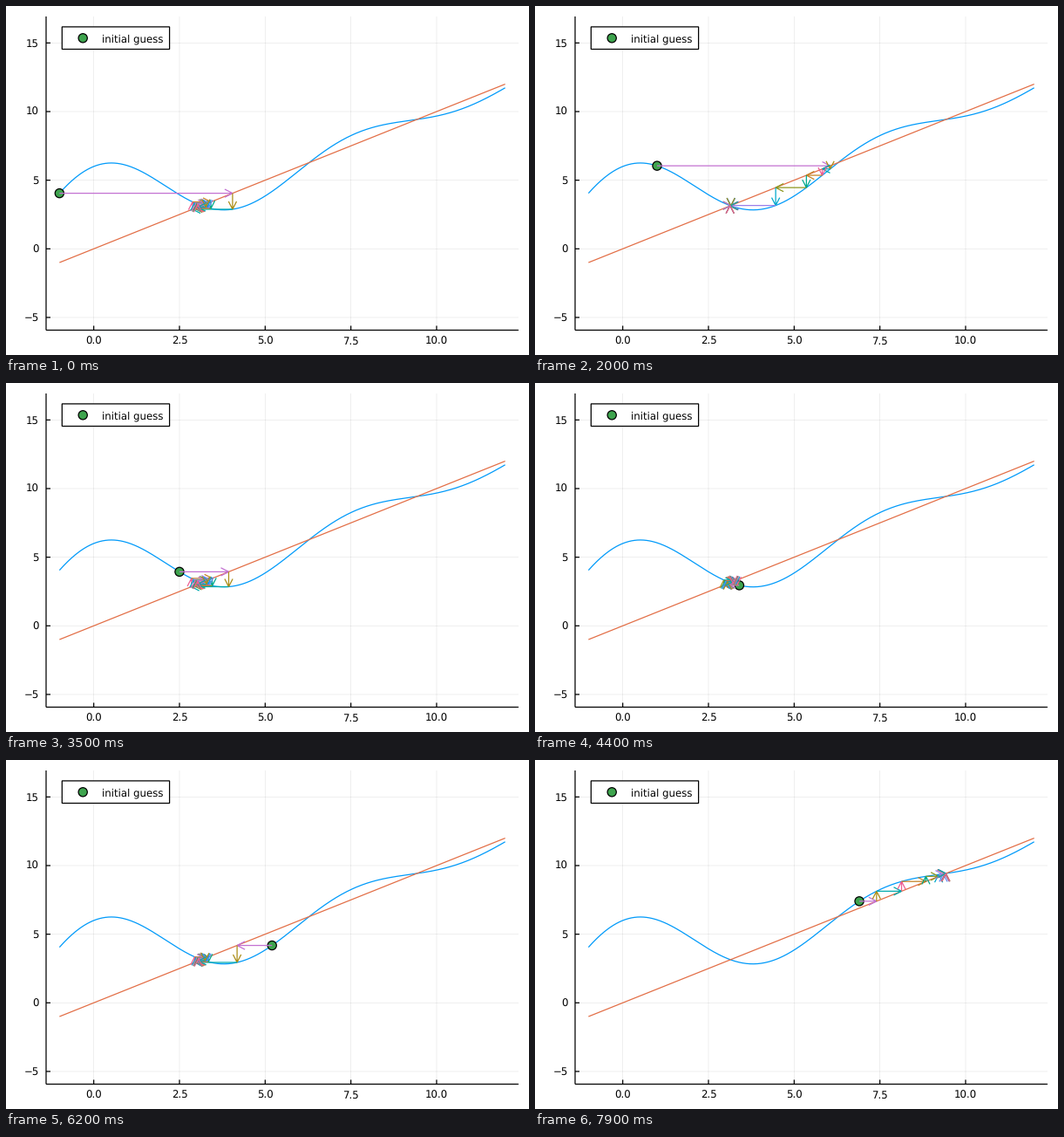
These frames come from a looping animation (600x400 px, 8000 ms). A matplotlib script:

```python
import numpy as np
import matplotlib.pyplot as plt
from matplotlib.animation import FuncAnimation
from matplotlib.patches import Circle, Rectangle

plt.rcParams.update({
    "font.family": "DejaVu Sans",
    "font.size": 8.5,
    "text.hinting": "none",
    "path.snap": False,
    "lines.solid_capstyle": "butt",
    "lines.solid_joinstyle": "miter",
})

W, H, DPI = 600, 400, 100
LW = 0.9
FRAMES, STEP_MS = 80, 100
STEPS = 10
HEAD_LEN, HEAD_HALF = 9.0, 4.6
LEFT, RIGHT, TOP, BOTTOM = 46, 588, 12, 371.5

PALETTE = [
    "#009AFA", "#E36F47", "#3EA44E", "#C371D2", "#AC8E18", "#00AAAE",
    "#ED5E93", "#C68225", "#00A98D", "#8E971E", "#00A9CC", "#9B7FE9",
    "#618DF6", "#F06073", "#DD65B6", "#6C9F33",
]


def g(x):
    """Iterated map x + 6 sin(x) / x."""
    return x + 6 * np.sinc(x / np.pi)


def px(x):
    return 100.67 + 39.332 * x


def py(y):
    return 278.3 - 15.73 * y


fig = plt.figure(figsize=(W / DPI, H / DPI), dpi=DPI, facecolor="white")
ax = fig.add_axes([0, 0, 1, 1])
ax.set_xlim(0, W)
ax.set_ylim(H, 0)
ax.axis("off")


def line(xs, ys, color="black", lw=LW, **kw):
    return ax.plot(xs, ys, color=color, lw=lw, **kw)[0]


def dot(x, y, z):
    return ax.add_patch(Circle((x, y), 5.1, fc=PALETTE[2], ec="black", lw=LW, zorder=z))


# Grid, ticks and axes
for v in (0, 2.5, 5, 7.5, 10):
    x = px(v)
    line([x, x], [TOP, BOTTOM], lw=0.45, alpha=0.1, zorder=1)
    line([x, x], [BOTTOM, BOTTOM - 5], zorder=2)
    ax.text(x, 388, f"{v:.1f}", ha="center", va="baseline")
for v in (-5, 0, 5, 10, 15):
    y = py(v)
    line([LEFT, RIGHT], [y, y], lw=0.45, alpha=0.1, zorder=1)
    line([LEFT, LEFT + 5], [y, y], zorder=2)
    ax.text(38, y + 4.3, str(v).replace("-", "\u2212"), ha="right", va="baseline")
line([LEFT, LEFT], [TOP, BOTTOM], zorder=2)
line([LEFT, RIGHT], [BOTTOM, BOTTOM], zorder=2)

# Map and diagonal
t = np.linspace(-1, 12, 600)
line(px(t), py(g(t)), PALETTE[0], zorder=3)
line(px(t[[0, -1]]), py(t[[0, -1]]), PALETTE[1], zorder=4)

guess = dot(0, 0, 5)
arrows = [line([], [], PALETTE[(3 + k) % 16], zorder=6 + k) for k in range(2 * STEPS)]

# Legend
ax.add_patch(Rectangle((64.3, 23.9), 123.3, 25.6, fc="white", ec="black", lw=LW, zorder=40))
dot(88.2, 36.8, 41)
ax.text(110.4, 41, "initial guess", va="baseline", zorder=41)


def set_arrow(art, start, end):
    """Shaft with an open head of fixed pixel size."""
    a = np.array([px(start[0]), py(start[1])])
    b = np.array([px(end[0]), py(end[1])])
    size = np.hypot(*(b - a))
    if size == 0:
        art.set_data([], [])
        return
    d = (b - a) / size
    n = np.array([-d[1], d[0]]) * HEAD_HALF
    back = b - d * HEAD_LEN
    gap = np.full(2, np.nan)
    art.set_data(*np.array([a, b, gap, back + n, b, back - n]).T)


def update(i):
    x = (i - 10) / 10
    y = g(x)
    guess.center = px(x), py(y)
    for k in range(STEPS):
        nxt = g(y)
        set_arrow(arrows[2 * k], (x, y), (y, y))
        set_arrow(arrows[2 * k + 1], (y, y), (y, nxt))
        x, y = y, nxt
    return [guess, *arrows]


anim = FuncAnimation(fig, update, frames=FRAMES, interval=STEP_MS,
                     repeat=True, repeat_delay=0, blit=False)
plt.show()
```
